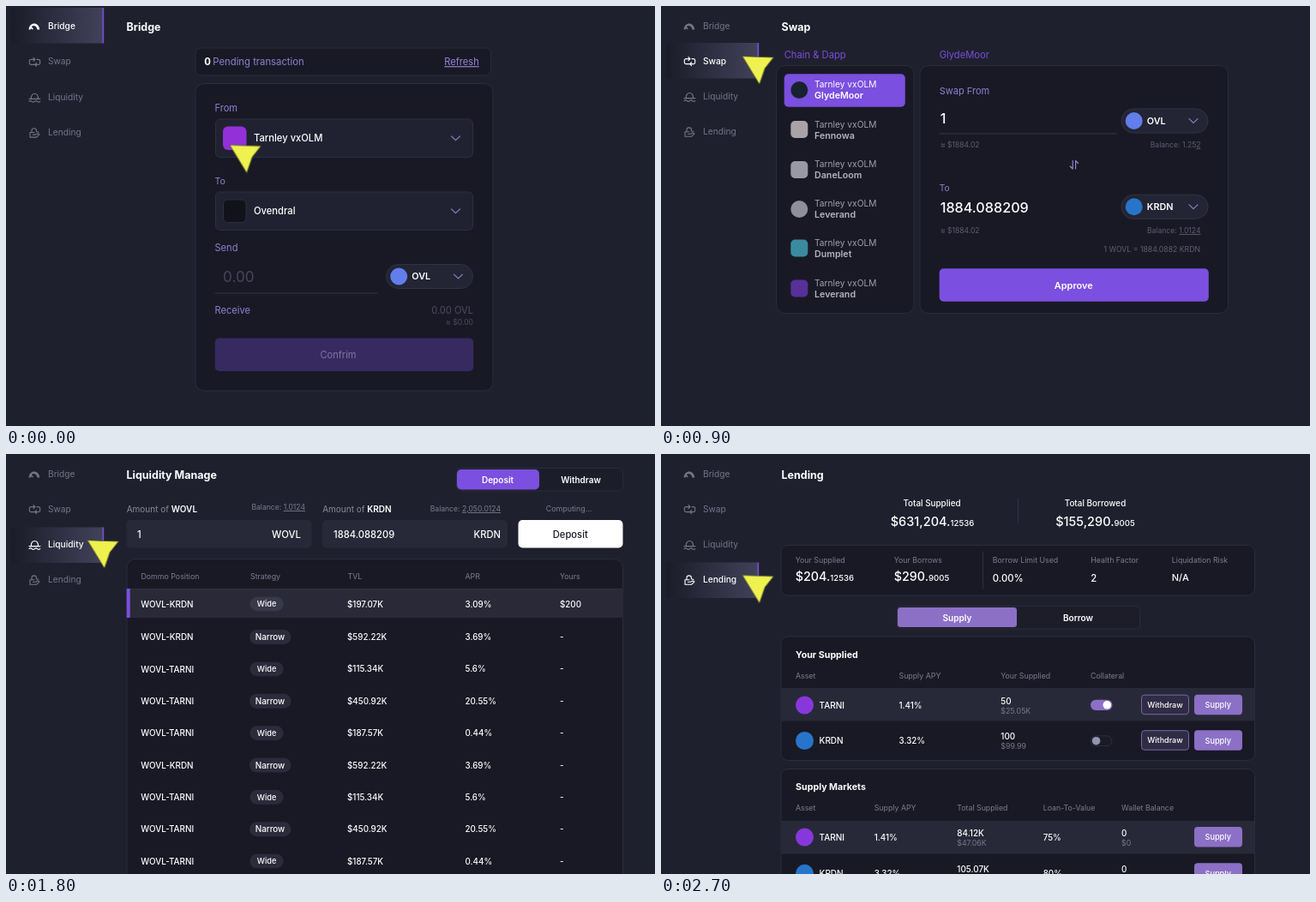
These frames come from a looping animation (757 by 490 pixels, 3.2 s). An HTML page:

```html
<!DOCTYPE html>
<html lang="en">
<head>
<meta charset="utf-8">
<title>Dashboard tour</title>
<style>
html, body { margin: 0; width: 100%; height: 100%; overflow: hidden; background: #1f202e; }
svg { display: block; width: 757px; height: 490px; font-family: Inter, "Open Sans", sans-serif; }
.u { text-decoration: underline; }
</style>
</head>
<body>
<svg id="stage" viewBox="0 0 757 490"></svg>
<script>
const LOOP = 3200;
const CHAIN = 'Tarnley vxOLM', COIN = 'OVL', WRAP = 'WOVL', USD = 'KRDN', TOK = 'TARNI';
const C = {
  white: '#fff', panel: '#191925', edge: '#2b2c3c', field: '#212231', row: '#282938',
  label: '#9080cf', violet: '#7b4fdf', lilac: '#8b70c6', grey: '#7b7c8e', dim: '#5d5e72',
  coin: '#627eea', usd: '#2775ca', tok: '#8837dc', heading: '#784fd8'
};

// y is the middle of the capitals
function text(x, y, s, size, fill = C.white, weight = 400, anchor = 'start') {
  return `<text x="${x}" y="${y + size * 0.36}" font-size="${size}" fill="${fill}" font-weight="${weight}" text-anchor="${anchor}">${s}</text>`;
}
const mid = (x, y, s, size, fill, weight) => text(x, y, s, size, fill, weight, 'middle');
const end = (x, y, s, size, fill, weight) => text(x, y, s, size, fill, weight, 'end');
const title = s => text(140.5, 24, s, 12.5, C.white, 700);

function box(x, y, x2, y2, r, fill, stroke = 'none') {
  return `<rect x="${x}" y="${y}" width="${x2 - x}" height="${y2 - y}" rx="${r}" fill="${fill}" stroke="${stroke}"/>`;
}
const panel = (x, y, x2, y2, r = 10) => box(x + .5, y + .5, x2 - .5, y2 - .5, r, C.panel, C.edge);
const dot = (x, y, r, fill) => `<circle cx="${x}" cy="${y}" r="${r}" fill="${fill}"/>`;
const path = (d, stroke, w = 1.2, fill = 'none') =>
  `<path d="${d}" fill="${fill}" stroke="${stroke}" stroke-width="${w}" stroke-linecap="round" stroke-linejoin="round"/>`;
const chevron = (x, y) => path(`M${x - 5} ${y - 2.4}l5 4.8 5-4.8`, '#9184cc', 1.15);
const rule = (x, y, x2, y2, color) => path(`M${x} ${y}L${x2} ${y2}`, color, 1);
const under = s => `<tspan class="u">${s}</tspan>`;

const menu = [
  ['Bridge', 23.5, (c, y) => `<path transform="translate(26.5 ${y})" d="M0 4C.8-5.4 12-5.4 12.8 4H10C9.2-.4 5.6-1.4 3.4 .4L5.4 3.4Q4.6 4.2 3.6 3.6L2.4 2.6 2.2 4Z" fill="${c}"/>`],
  ['Swap', 64, 'M8 3H2.5Q.3 3 .3 .8V-1Q.3-3 2.5-3H6.6M5-5L7-3 5-1M9-3H10.5Q12.7-3 12.7-1V.8Q12.7 3 10.5 3H7M8.6 1L6.6 3 8.6 5'],
  ['Liquidity', 105.2, 'M2.4 1.4C1.6-6.2 11.2-6.2 10.4 1.4M0 1.8H12.8M0 4.8q1.6-1.5 3.2 0t3.2 0 3.2 0 3.2 0'],
  ['Lending', 146.7, 'M1-.6V5H8.6L12 1.6 10 .6 7.4 2H4.4M3-.6V-3A2.7 2.4 0 0 1 8.4-3V-1.6L11-.8M1-.6H6']
];

function sidebar(active) {
  return menu.map(([name, base, icon], i) => {
    const on = i === active, y = base + (active === 0 && i ? .8 : 0);
    const c = on ? C.white : '#747588';
    const top = [2, 43, 85.5, 126.5][i];
    const back = on ? box(6, top, 112.5, top + 41.5, 0, 'url(#glow)') + box(112.3, top, 114.2, top + 41.5, 0, '#7450cf') : '';
    const mark = typeof icon === 'string'
      ? `<g transform="translate(27 ${y + .6})">${path(icon, c, 1.1)}</g>` : icon(c, y);
    return back + mark + text(49, y, name, 10.2, c, on ? 500 : 400);
  }).join('');
}

function picker(y, name, icon) {
  return box(244.5, y + .5, 544.5, y + 45, 5, C.field, '#2c2d3e') + icon +
    text(289, y + 22.5, name, 11.2, C.white, 500) + chevron(524.5, y + 22.8);
}
function coinPill(x, y, name, color) {
  return box(x + .5, y + .5, x + 101.5, y + 28.5, 14, '#232434', '#313246') +
    dot(x + 15.2, y + 14.5, 10, color) + text(x + 30.3, y + 14.5, name, 10.8, C.white, 600) + chevron(x + 84.5, y + 14.5);
}

function bridge() {
  return title('Bridge') + panel(220.5, 48.5, 566, 81.5, 6) +
    text(231.3, 65.2, '0', 11.3, C.white, 700) + text(241.3, 65.2, 'Pending transaction', 11.3, C.label) +
    text(511.3, 65.2, under('Refresh'), 11.1, '#9a84dc') +
    panel(220.5, 90, 568.5, 449.5) +
    text(243.5, 119, 'From', 11.1, C.label) +
    picker(131.5, CHAIN, box(253, 140.5, 280.5, 168, 6, '#9330d8')) +
    text(243.5, 204, 'To', 10.6, C.label) +
    picker(216.5, 'Ovendral', box(253.5, 226, 280, 252.5, 5, '#12121b', '#2d2d3e')) +
    text(243.5, 282.5, 'Send', 11.1, C.label) +
    text(253, 316.3, '0.00', 17.2, '#46475b') + rule(244, 335, 433, 335, '#303143') +
    coinPill(443, 301, COIN, C.coin) +
    text(243.5, 355.5, 'Receive', 11.1, C.label) +
    end(545, 355.5, '0.00 ' + COIN, 11.1, '#4b4c61') + end(545, 369, '≈ $0.00', 8.6, '#4b4c61') +
    box(243.7, 387.5, 545.2, 426, 5, '#372a60') + mid(387.5, 407, 'Confrim', 11.1, '#7f76a2');
}

function swap() {
  const apps = [
    ['GlydeMoor', 91, 98, '#18222f'], ['Fennowa', 138.5, 144, '#a9a2a7'], ['DaneLoom', 184.5, 191, '#9899a2'],
    ['Leverand', 230.5, 237, '#8e8f97'], ['Dumplet', 276, 282.5, '#3a8ba0'], ['Leverand', 323, 329.5, '#57309a']
  ];
  const list = apps.map(([name, y, iy, color], i) =>
    (i === 0 || i === 3 ? dot(161.3, iy, 10, color) : box(151.3, iy - 10, 171.3, iy + 10, 5, color)) +
    text(179, y, CHAIN, 10.2, i ? '#a0a1ae' : C.white) +
    text(179, y + 12.9, name, 10.7, i ? '#b3b4bf' : C.white, 600)).join('');
  return title('Swap') + text(143.7, 57, 'Chain &amp; Dapp', 11.2, C.heading) + text(324.7, 57, apps[0][0], 11.2, C.heading) +
    panel(134, 69, 295.5, 359) + panel(301.5, 69, 662, 359) +
    box(143.7, 79.3, 284.8, 117.7, 5, C.violet) + list +
    text(324.7, 99.5, 'Swap From', 11, C.label) +
    text(325.7, 131, '1', 16, C.white, 500) + rule(325, 149, 531, 149, '#34354a') +
    coinPill(536.5, 119.5, COIN, C.coin) +
    text(326, 162, '≈ $1884.02', 8.5, C.dim) + end(629.5, 162, 'Balance: 1.25' + under('2'), 8.6, C.dim) +
    path('M480.2 180.5v9.5l-3-3M483.6 190v-9.5l3 3', '#9a8ad8', 1.1) +
    text(324.7, 212.5, 'To', 10.2, C.label) + text(325.7, 235.3, '1884.088209', 16.2, C.white, 500) +
    coinPill(536.5, 219.7, USD, C.usd) +
    text(326, 262, '≈ $1884.02', 8.5, C.dim) + end(629.5, 262, 'Balance: ' + under('1.0124'), 8.6, C.dim) +
    end(629, 284, `1 ${WRAP} = 1884.0882 ${USD}`, 8.7, C.dim) +
    box(324.7, 306.3, 638.8, 344.8, 5, C.violet) + mid(481.3, 326, 'Approve', 11, C.white, 600);
}

function liquidity() {
  const amount = (x, name) => text(x, 64, `Amount of <tspan fill="#fff" font-weight="600">${name}</tspan>`, 10, '#898a9a');
  const kinds = [
    [TOK, 0, '187.57', '0.44'], [USD, 1, '592.22', '3.69'], [TOK, 0, '115.34', '5.6'], [TOK, 1, '450.92', '20.55']
  ];
  let rows = '';
  for (let i = 0; i < 9; i++) {
    const y = i ? 213.6 + (i - 1) * 37.35 : 175;
    const [pair, narrow, tvl, apr] = i ? kinds[i % 4] : [USD, 0, '197.07', '3.09'];
    rows += text(157.3, y, `${WRAP}-${pair}`, 9.9, C.white, 500) +
      (narrow
        ? box(284, y - 8.5, 332.5, y + 8.5, 8.5, '#2b2b3b') + mid(308, y, 'Narrow', 9.9, C.white, 500)
        : box(284.5, y - 8.3, 323.7, y + 8.3, 8.3, i ? '#2b2b3b' : '#39394c') + mid(304, y, 'Wide', 9.2, C.white, 500)) +
      text(398, y, `$${tvl}K`, 9.8, C.white, 500) + text(535.5, y, apr + '%', 9.8, C.white, 500) +
      text(646, y, i ? '-' : '$200', 9.8, C.white, 500);
  }
  const heads = [[157.5, 'Dommo Position'], [285, 'Strategy'], [398.5, 'TVL'], [535.5, 'APR'], [646, 'Yours']];
  return title('Liquidity Manage') +
    box(525.5, 16.5, 719.5, 43, 6, '#1d1d2a', C.edge) + box(526, 18, 622, 41.5, 5, C.violet) +
    mid(573.5, 30, 'Deposit', 10, C.white, 600) + mid(670.5, 30, 'Withdraw', 10, C.white, 600) +
    amount(140.7, WRAP) + end(349, 62, 'Balance: ' + under('1.0124'), 8.6, C.grey) +
    amount(369.2, USD) + end(577, 64, 'Balance: ' + under('2,050.0124'), 8.6, C.grey) +
    mid(656.5, 64, 'Computing...', 8.9, C.grey) +
    box(140.5, 77, 356.5, 109.5, 5, C.row) + text(153, 93.5, '1', 11.3, C.white, 500) + end(344, 93.5, WRAP, 11.3, C.white, 500) +
    box(369, 77, 585, 109.5, 5, C.row) + text(382, 93.5, '1884.088209', 11.2, C.white, 500) + end(577, 93.5, USD, 11.2, C.white, 500) +
    box(597.5, 77, 719.5, 109.5, 5, C.white) + mid(658.3, 93.5, 'Deposit', 11.2, '#1b1b28', 500) +
    panel(140.5, 122, 720, 510) + heads.map(([x, s]) => text(x, 143.3, s, 8.8, C.grey)).join('') +
    box(141, 157, 719.5, 191, 0, '#292938') + rule(141, 157.5, 719.5, 157.5, '#303041') +
    box(140.7, 157, 144.7, 191, 0, C.violet) + rows;
}

function lending() {
  const money = (big, small) => `${big}<tspan font-size="9.6">${small}</tspan>`;
  const heads = (y, list) => list.map(([x, s]) => text(x, y, s, 8.8, C.grey)).join('');
  const pair = (x, y, a, b) => text(x, y - 5, a, 9.9, C.white, 500) + text(x, y + 6.6, b, 8.8, '#77788a');
  const asset = (y, name, color) => dot(167.5, y, 10.5, color) + text(184.5, y, name, 10, C.white, 500);
  const supply = y => box(622, y - 12, 678, y + 11.5, 4, C.lilac) + mid(649.7, y, 'Supply', 9.2, C.white, 500);
  const withdraw = y => box(560.5, y - 11.5, 615.5, y + 11, 3.5, '#302c45', '#7667a8') + mid(588, y, 'Withdraw', 9, C.white, 500);
  const held = (y, name, color, apy, a, b) => asset(y, name, color) + text(277.5, y, apy, 9.8, C.white, 500) +
    pair(396.3, y, a, b) + withdraw(y - .3) + supply(y - .3);
  const market = (y, name, color, apy, a, b, ltv) => asset(y, name, color) + text(248.7, y, apy, 9.8, C.white, 500) +
    pair(345.3, y, a, b) + text(445.7, y, ltv, 9.8, C.white, 500) + pair(537, y, '0', '$0') + supply(y);
  return title('Lending') +
    mid(316, 57.5, 'Total Supplied', 9.9, C.white, 500) + mid(316.5, 78.3, money('$631,204.', '12536'), 14.5, C.white, 500) +
    rule(416.5, 52, 416.5, 81, '#322f55') +
    mid(506.5, 57.5, 'Total Borrowed', 9.9, C.white, 500) + mid(506.5, 78.3, money('$155,290.', '9005'), 14.5, C.white, 500) +
    panel(139.5, 106, 693, 165.5, 8) +
    heads(123.5, [[156.8, 'Your Supplied'], [271.8, 'Your Borrows'], [386.8, 'Borrow Limit Used'], [501.3, 'Health Factor'], [595.8, 'Liquidation Risk']]) +
    text(156.8, 142.7, money('$204.', '12536'), 14.3, C.white, 500) + text(271.8, 142.7, money('$290.', '9005'), 14.3, C.white, 500) +
    rule(375.5, 114, 375.5, 157, '#2e2f41') +
    text(386.8, 144.5, '0.00%', 11.3, C.white, 500) + text(501.3, 144.5, '2', 11.3, C.white, 500) + text(595.8, 144.5, 'N/A', 11, C.white, 500) +
    box(275.5, 177.5, 558.5, 204, 4, '#1d1d2a', C.edge) + box(276, 179, 415, 202, 3.5, C.lilac) +
    mid(345.5, 191, 'Supply', 10.1, C.white, 600) + mid(486.5, 191, 'Borrow', 10.1, C.white, 600) +
    panel(139.5, 212.5, 693, 358, 8) + text(157, 234, 'Your Supplied', 10.7, C.white, 700) +
    heads(258.5, [[157, 'Asset'], [277.5, 'Supply APY'], [396.3, 'Your Supplied'], [501, 'Collateral']]) +
    box(140, 273, 692.5, 311.5, 0, C.row) +
    held(293, TOK, C.tok, '1.41%', '50', '$25.05K') + held(334.5, USD, C.usd, '3.32%', '100', '$99.99') +
    box(501, 286.7, 526.5, 299, 6.2, C.lilac) + dot(520.3, 292.8, 4.8, C.white) +
    box(501.5, 328.8, 526, 340.7, 6, '#1b1b28', '#2d2e40') + dot(507.6, 334.7, 4.8, '#9495ad') +
    panel(139.5, 367, 693, 510, 8) + text(157, 388, 'Supply Markets', 10.7, C.white, 700) +
    heads(413, [[157, 'Asset'], [248.7, 'Supply APY'], [345.3, 'Total Supplied'], [445.7, 'Loan-To-Value'], [537, 'Wallet Balance']]) +
    box(140, 428, 692.5, 466.5, 0, C.row) +
    market(447, TOK, C.tok, '1.41%', '84.12K', '$47.06K', '75%') +
    market(489.3, USD, C.usd, '3.32%', '105.07K', '$105.02K', '80%');
}

const stage = document.getElementById('stage');
stage.innerHTML =
  '<defs><linearGradient id="glow"><stop offset="0" stop-color="#1b1c28"/>' +
  '<stop offset="1" stop-color="#41425a"/></linearGradient></defs>' +
  '<rect width="757" height="490" fill="#1f202e"/>' +
  [bridge, swap, liquidity, lending].map((page, i) => `<g class="page">${sidebar(i)}${page()}</g>`).join('') +
  `<g id="cursor">${path('M-.3-.3L35.8 1 25.8 13.6 19.4 32Z', '#54562a', .8, '#eff14f')}</g>`;

// steps: [start in ms, style]; every style holds until the next one
function play(el, steps) {
  const frames = steps.map(([t, style]) => ({ ...style, offset: t / LOOP, easing: 'step-end' }));
  frames.push({ ...steps[steps.length - 1][1], offset: 1 });
  el.animate(frames, { duration: LOOP, iterations: Infinity });
}

const turns = [0, 900, 1800, 2700];
stage.querySelectorAll('.page').forEach((el, i) =>
  play(el, turns.map((t, k) => [t, { opacity: k === i ? 1 : 0 }])));

const spots = [
  [0, 261.5, 162.5], [200, 95.5, 59], [700, 92.5, 65], [900, 95.5, 59], [1100, 95.5, 101],
  [1600, 92.5, 105], [1800, 95.5, 101], [2000, 95.5, 141.7], [2500, 92.5, 145.5], [2700, 95.5, 141.7]
];
play(document.getElementById('cursor'),
  spots.map(([t, x, y]) => [t, { transform: `translate(${x}px, ${y}px)` }]));
</script>
</body>
</html>
```
